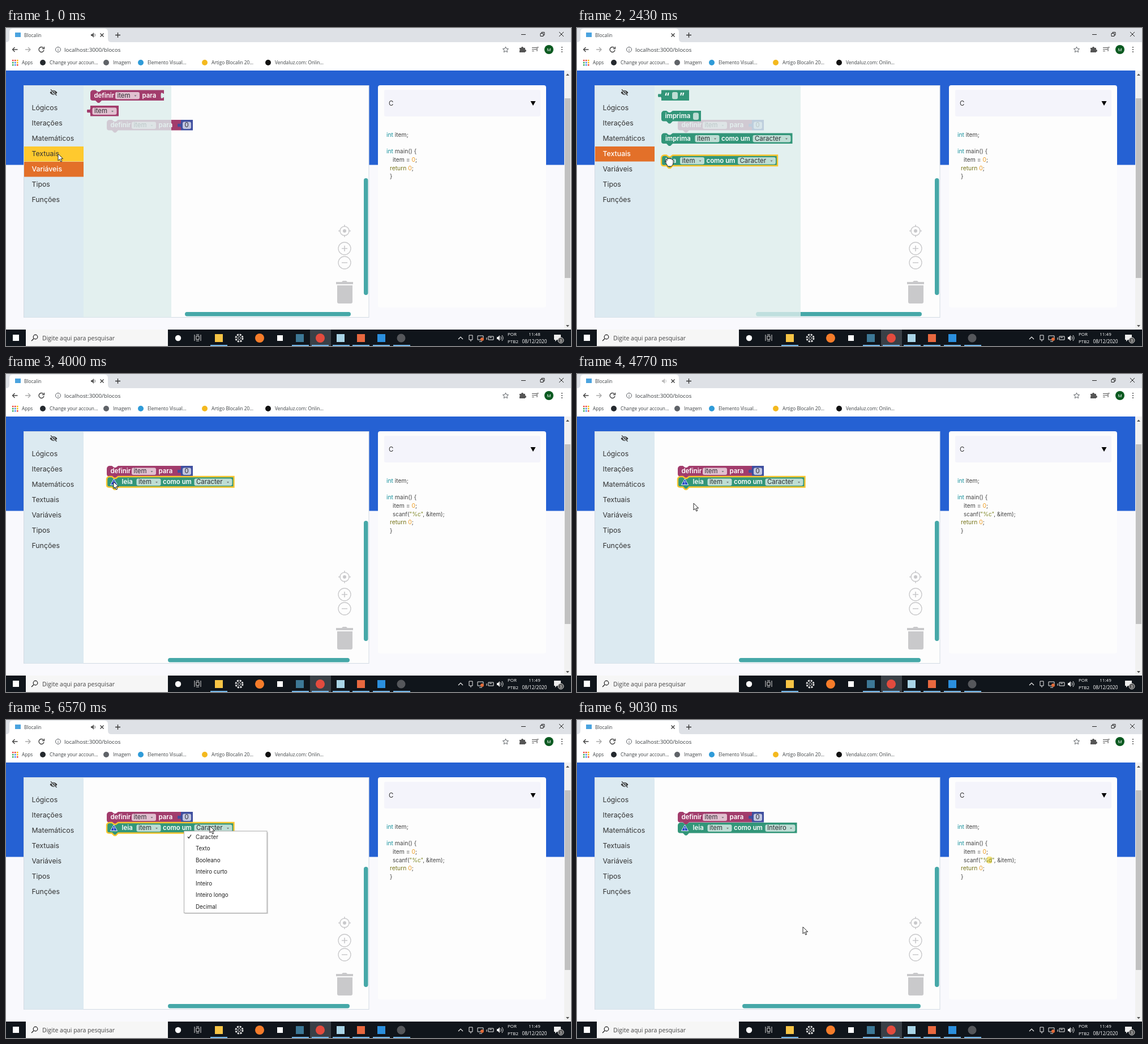
These frames come from a looping animation (998x561 px, 9.06 s). An HTML page:

```html
<!DOCTYPE html>
<html lang="pt">
<head>
<meta charset="utf-8">
<title>Blocos</title>
<style>
html, body { margin: 0; width: 100%; height: 100%; overflow: hidden; background: #fff; }
svg { display: block; width: 998px; height: 561px; }
.ui { font-family: "Open Sans", "Noto Sans", sans-serif; white-space: pre; }
.app { font-family: Inter, "Open Sans", sans-serif; white-space: pre; }
</style>
</head>
<body>
<svg id="stage" viewBox="0 0 998 561"><g id="page"></g><g id="live"></g></svg>
<script>
const LOOP = 9060;
const COLOR = { variable: '#a23c6c', text: '#329679', math: '#3f4f9f', bar: '#46a8a8', flyout: '#deeeed', menu: '#dceaf1' };

const rect = (x, y, w, h, fill, more = '') => `<rect x="${x}" y="${y}" width="${w}" height="${h}" fill="${fill}" ${more}/>`;
const circle = (x, y, r, fill, more = '') => `<circle cx="${x}" cy="${y}" r="${r}" fill="${fill}" ${more}/>`;
const line = (d, color, width = 1, more = '') => `<path d="${d}" fill="none" stroke="${color}" stroke-width="${width}" ${more}/>`;
const shape = (d, fill, more = '') => `<path d="${d}" fill="${fill}" ${more}/>`;
const ui = (x, y, size, s, fill = '#3c4043', more = '') => `<text class="ui" x="${x}" y="${y}" font-size="${size}" fill="${fill}" ${more}>${s}</text>`;
const app = (x, y, size, s, fill = '#333', more = '') => `<text class="app" x="${x}" y="${y}" font-size="${size}" fill="${fill}" ${more}>${s}</text>`;
const ink = (color, s) => `<tspan fill="${color}">${s}</tspan>`;

function browser() {
  const dots = ['#ea4335', '#ea4335', '#fbbc04', '#34a853', '#4285f4', '#fbbc04', '#34a853', '#4285f4', '#ea4335'];
  const bookmarks = [
    [77, 'Change your accoun...', '#24292e'], [189, 'Imagem', '#5f6368'], [250, 'Elemento Visual...', '#2f9bd8'],
    [363, 'Artigo Blocalin 20...', '#f4b91f'], [475, 'Vendaluz.com: Onlin...', '#111']];
  return rect(0, 0, 998, 25, '#dee1e6')
    + shape('M0 25q6 0 6-6V7q0-6 6-6H174q6 0 6 6V19q0 6 6 6z', '#fff')
    + rect(0, 25, 998, 50, '#fff')
    + rect(16, 8, 10, 8, '#4aa3df')
    + ui(32, 16, 8.3, 'Blocalin')
    + line('M166.500 9.500l6 6m0-6l-6 6', '#333', 1.2)
    + line('M193 12.500h9m-4.500-4.500v9', '#333', 1.3)
    + line('M910 11.500h8M977 7l8 8m0-8l-8 8', '#222')
    + line('M944 9.500h5v5h-5zM946 9.500v-2h5v5h-2', '#222')
    + line('M20.500 38h-9m4-4l-4 4 4 4', '#444', 1.4)
    + line('M34 38h9m-4-4l4 4-4 4', '#aaa', 1.4)
    + line('M66 35a4.500 4.500 0 1 0 1 4M67.500 33v3.500H64', '#444', 1.4)
    + circle(92, 38, 4.5, 'none', 'stroke="#5f6368"') + line('M92 37.500v3M92 35v1', '#5f6368')
    + ui(103, 41.5, 9.8, 'localhost:3000/blocos')
    + line('M882.500 33l1.500 3.500 3.500.3-2.700 2.400.8 3.500-3.100-1.900-3.100 1.900.8-3.500-2.700-2.400 3.500-.3z', '#5f6368')
    + shape('M907 35h3a2 2 0 0 1 4 0h3v3a2 2 0 0 1 0 4v1h-10v-3a2 2 0 0 0 0-3z', '#555')
    + line('M929 34.500h8M929 37.500h8M929 40.500h4M938 41v-7h3', '#555', 1.2)
    + circle(959, 38, 8, '#0b5a20') + ui(959, 41, 8, 'M', '#fff', 'text-anchor="middle"')
    + [34, 38, 42].map(y => circle(982, y, 1.1, '#555')).join('')
    + dots.map((c, i) => rect(11 + i % 3 * 4, 56 + Math.floor(i / 3) * 4, 2.5, 2.5, c)).join('')
    + ui(28, 64, 8.2, 'Apps')
    + bookmarks.map(([x, s, c]) => circle(x - 12, 61, 5, c) + ui(x, 64, 8.3, s)).join('');
}

function taskbar() {
  const tiles = [[376, '#f6c445'], [519, '#3d7896'], [591, '#a9d4e6'], [627, '#e8683f'], [663, '#2b8fdd']];
  const running = [376, 520, 555, 592, 627, 663, 699];
  return rect(0, 532, 998, 29, '#10151b')
    + rect(12, 541, 11, 11, '#fff')
    + rect(35, 532, 251, 29, '#f6f6f6')
    + circle(52, 545, 3.8, 'none', 'stroke="#222" stroke-width="1.2"') + line('M49 548l-4 4', '#222', 1.2)
    + ui(64, 551, 10.5, 'Digite aqui para pesquisar', '#444')
    + circle(304, 547, 5.2, '#fff')
    + line('M333 541v11M336 543.500h5v6h-5zM336 541h5M336 552h5M344 541v11', '#ddd')
    + circle(412, 547, 6, 'none', 'stroke="#ddd" stroke-width="3" stroke-dasharray="3 1.700"') + circle(412, 547, 2.5, 'none', 'stroke="#ddd"')
    + circle(448, 547, 8, '#f57c2a') + rect(479, 542, 10, 10, '#fff')
    + rect(537, 532, 37, 29, '#3a4047')
    + circle(555, 547, 8, '#e34b3e') + circle(698, 547, 7.5, '#55575b')
    + tiles.map(([x, c]) => rect(x - 7, 540, 14, 14, c)).join('')
    + running.map(x => rect(x - 15, 559, 30, 2, '#76b9ed')).join('')
    + line('M799 549l4-4 4 4', '#eee', 1.2)
    + line('M818 542h6v8h-6zM821 550v3', '#eee')
    + line('M833 543h10v7h-10zM836 553h5', '#eee') + circle(841, 549, 3, '#e06a38')
    + line('M852 544h9v6h-9zM849 546v4M854 546h4', '#eee')
    + shape('M867 545h2l3-3v10l-3-3h-2z', '#eee') + line('M874 544q2 3 0 6M876 542q4 5 0 10', '#eee')
    + ui(886, 543, 8, 'POR', '#fff') + ui(886, 556, 8, 'PTB2', '#fff')
    + ui(933.5, 556, 8.3, '08/12/2020', '#fff', 'text-anchor="middle"')
    + shape('M968 541h12v9h-7l-3 3v-3h-2z', '#eee') + circle(980, 551, 5, '#555', 'stroke="#ccc"')
    + ui(980, 554, 7, '3', '#fff', 'text-anchor="middle"');
}

function workspace() {
  const grey = '#c9c9cb';
  const ring = y => circle(598, y, 11, 'none', `stroke="${grey}" stroke-width="1.300"`);
  return rect(0, 75, 998, 457, '#f9f9fd')
    + rect(0, 75, 986, 166.5, '#2561d3')
    + rect(31.5, 101.5, 609.5, 409, '#fdfdfd', 'stroke="#d3dbe3" stroke-width="1"')
    + circle(598, 358, 8, 'none', `stroke="${grey}" stroke-width="1.500"`) + circle(598, 358, 3, grey)
    + line('M598 347v4M598 365v4M587 358h4M605 358h4', grey, 1.5)
    + ring(389) + ring(414) + line('M593 389h10M598 384v10M593 414h10', grey, 1.6)
    + shape('M583 448h10l2-2h6l2 2h10v4h-30zM585 454h27v29q0 3-3 3h-21q-3 0-3-3z', grey)
    + rect(657, 101, 297, 392, '#fdfdfd', 'rx="4"')
    + rect(668, 109, 276, 47, '#f4f4fb', 'rx="3"')
    + app(676, 137, 11.5, 'C') + shape('M926.500 129h9l-4.500 8z', '#000')
    + rect(986, 75, 12, 457, '#f1f1f1') + rect(987, 124, 10, 317, '#c1c1c1')
    + shape('M989 84h6l-3-3.500z', '#555') + shape('M989 524h6l-3 3.500z', '#555');
}

const TAB = 'c0 7.500-6-6-6 5.600s6-1.900 6 5.600';
const SELECTED = 'stroke="#fbc52d" stroke-width="2.400"';

const statement = (x, y, w, color, more = '') => shape(
  `M${x} ${y + 5}a5 5 0 0 1 5-5h4l4 3h3l4-3H${x + w}v18.500H${x + 20}l-4 4h-3l-4-4H${x + 4}q-4 0-4-4z`, color, more);
const valueBlock = (x, y, w, color) => shape(`M${x} ${y}h${w}v18.500H${x}V${y + 15.2}` +
  `c0-7.500-6 1.500-6-5.600s6 1.900 6-5.600z`, color);
const label = (x, y, s) => app(x, y + 13, 11.4, s, '#fff', 'font-weight="600"');
const field = (x, y, w, s, arrow = true) => rect(x, y + 3.5, w, 12.5, '#fff', 'rx="3" fill-opacity=".68"')
  + app(x + 3.5, y + 13.2, 11.4, s, '#2e2e33') + (arrow ? shape(`M${x + w - 9.5} ${y + 9}h4l-2 2.600z`, '#777') : '');

function defineBlock(x, y, w) {
  return statement(x, y, w, COLOR.variable) + label(x + 6.5, y, 'definir')
    + field(x + 44, y, 43, 'item') + label(x + 91.5, y, 'para');
}

function typedBlock(x, y, verb, shift, type, typeWidth, more) {
  return statement(x, y, 138 + shift + typeWidth, COLOR.text, more) + label(x + 7 + Math.min(shift, 19.5) * (verb === 'leia'), y, verb)
    + field(x + 33 + shift, y, 43, 'item') + label(x + 79.5 + shift, y, 'como um') + field(x + 135 + shift, y, typeWidth, type);
}

const warning = (x, y) => shape(`M${x} ${y + 14.5}l6-10.500 6 10.500z`, '#1d45c4', 'stroke="#e8eefc" stroke-linejoin="round"')
  + line(`M${x + 6} ${y + 8}v3M${x + 6} ${y + 12}v1.300`, '#fff', 1.3);

function variableFlyout() {
  return defineBlock(149, 109.5, 130) + shape(`M279.500 113.500${TAB}z`, COLOR.flyout)
    + valueBlock(149, 137, 50, COLOR.variable) + field(152.5, 137, 43, 'item');
}

function textFlyout(pressed) {
  return valueBlock(149, 109.5, 49, COLOR.text)
    + app(154, 127, 17, '“', '#fff', 'font-weight="700"') + app(181, 127, 17, '”', '#fff', 'font-weight="700"')
    + field(168, 109.5, 10, '', false)
    + statement(149, 146, 70, COLOR.text) + label(155.5, 146, 'imprima') + field(205, 146, 10, '', false)
    + typedBlock(149, 185.5, 'imprima', 26.5, 'Caracter', 67)
    + typedBlock(149, 224.5, 'leia', 0, 'Caracter', 67, pressed ? SELECTED : '');
}

function menu(t) {
  const names = ['Lógicos', 'Iterações', 'Matemáticos', 'Textuais', 'Variáveis', 'Tipos', 'Funções'];
  const chosen = t < 500 ? 4 : t < 2860 ? 3 : -1;
  const hovered = t < 500 ? 3 : -1;
  return rect(32, 102, 105, 408.5, COLOR.menu)
    + shape('M77.500 114q6.500-8 13 0q-6.500 8-13 0z', '#333') + circle(84, 114, 2.5, '#333', 'stroke="#dceaf1"')
    + line('M79 109l10 10', COLOR.menu, 2.5) + line('M79 108.500l10.500 10.500', '#333', 1.3)
    + names.map((name, i) => {
      const y = 128 + 27 * i;
      const fill = i === chosen ? '#e37029' : i === hovered ? '#ffc92e' : null;
      return (fill ? rect(32, y, 105, 26.5, fill) : '')
        + app(45.5, y + 17, 12.3, name, i === chosen ? '#fff' : '#333', i === chosen ? 'font-weight="500"' : '');
    }).join('');
}

function code(t) {
  const dragged = t >= 2950 && t < 3950, joined = t >= 3950, integer = t >= 8350;
  const row = n => 192 + 14.65 * n;
  const put = (x, n, s) => app(x, row(n), 10.3, s, '#444');
  const scanRow = dragged ? 5 : 4;
  const end = dragged ? 6 : joined ? 5 : 4;
  const glow = Math.max(0, Math.min(1, (3900 - t) / 400));
  let out = '';
  if (dragged) out += `<g opacity="${glow}">${rect(683, 255, 92, 13.5, '#f8df91')}${rect(672, 269.5, 5.5, 13.5, '#f8df91')}</g>`;
  if (integer) out += rect(724, 241, 9, 12, '#f3e27c', 'rx="3"');
  out += put(672, 0, ink('#16919c', 'int') + ' item;')
    + put(672, 2, ink('#16919c', 'int') + ' main() {')
    + put(683, 3, 'item = ' + ink('#ee9b22', '0') + ';')
    + put(678, end, ink('#77751b', 'return') + ' ' + ink('#ee9b22', '0') + ';')
    + put(678, end + 1, '}');
  if (dragged || joined) {
    out += `<text class="app" x="683" y="${row(scanRow)}" font-size="9.9" fill="#444">scanf(${ink('#7d8522', `"%${integer ? 'd' : 'c'}"`)}, &amp;item);</text>`;
  }
  return out;
}

function scrollbars(t) {
  const [x1, x2, y1, y2] = t < 2860 ? [316, 609, 265, 471] : t < 3950 ? [312, 626, 245, 468]
    : t < 8250 ? [286, 607, 259, 471] : [292, 607, 259, 471];
  return rect(x1, 501, x2 - x1, 7.5, COLOR.bar, 'rx="3.700"') + rect(632, y1, 7.5, y2 - y1, COLOR.bar, 'rx="3.700"');
}

function typeList(t, [, y]) {
  const types = ['Caracter', 'Texto', 'Booleano', 'Inteiro curto', 'Inteiro', 'Inteiro longo', 'Decimal'];
  const over = Math.floor((y + 1 - 196) / 20.45);
  return rect(316, 198, 147, 144, '#000', 'opacity=".15"')
    + rect(314.5, 196, 146.5, 144.5, '#fff', 'stroke="#aaa"')
    + types.map((name, i) => (i === over ? rect(315, 196.5 + 20.45 * i, 145.5, 20.4, '#d6e9f8') : '')
      + app(335, 210 + 20.45 * i, 9.8, name, '#222')).join('')
    + line('M321 206l2 2.500 4-6', '#222', 1.3);
}

// Pointer tip: time, x, y
const PATH = [[0, 92, 222], [900, 92, 222], [1350, 128, 226], [1900, 158, 231], [2800, 158, 231],
  [3150, 188, 234], [3370, 194, 232], [3600, 193, 218], [3900, 190, 190], [4150, 190, 190], [4650, 206, 228], [4850, 206, 228],
  [5350, 360, 187], [6600, 360, 187], [7350, 368, 283], [8300, 368, 283], [8850, 399, 365], [LOOP, 399, 365]];

function pointerAt(t) {
  const i = PATH.findIndex(p => p[0] > t);
  const [a, b] = [PATH[i - 1], PATH[i]];
  const u = (t - a[0]) / (b[0] - a[0]), e = u * u * (3 - 2 * u);
  return [a[1] + (b[1] - a[1]) * e, a[2] + (b[2] - a[2]) * e];
}

function pointer(t, [x, y]) {
  const hand = t > 1800 && t < 4000;
  const d = hand ? 'M-2 2q2-2 3 1V0q2-2 3 0q2-2 3 0q2-1 3 1q2 0 2 2v4q0 3-3 6H2Q1 9-2 6q-2-2 0-2l2 2z'
    : 'M0 0V12l2.800-2.600 2 4.600 2-.9-2-4.400h3.900z';
  return `<g transform="translate(${x} ${y})">${shape(d, '#fff', 'stroke="#111" stroke-width=".9"')}</g>`;
}

function speaker(t) {
  const level = t < 900 ? (850 - t) / 350 : t < 3950 ? 0 : t < 5400 ? (4950 - t) / 450 : (7750 - t) / 400;
  const opacity = Math.max(0, Math.min(1, level));
  return `<g opacity="${opacity}">${shape('M150 11h2l3-3v9l-3-3h-2z', '#555')}${line('M156.500 10q2 2.500 0 5', '#555')}</g>`;
}

function blocks(t, [px, py]) {
  let out = defineBlock(178, 162, 131) + valueBlock(309, 162, 21, COLOR.math) + field(312, 162, 15, '0', false);
  if (t >= 2860 && t < 3950) {
    out += `<g>${typedBlock(px - 12, py - 7, 'leia', 0, 'Caracter', 67, SELECTED + ' fill-opacity=".8"')}</g>`;
  } else if (t >= 3950) {
    const integer = t >= 8250;
    out += typedBlock(178, 181, 'leia', 19.5, integer ? 'Inteiro' : 'Caracter', integer ? 53 : 67, t < 8850 ? SELECTED : '')
      + warning(184.5, 181);
  }
  return out;
}

function flyout(t) {
  if (t >= 2860) return '';
  const first = t < 500;
  return rect(137, 102, first ? 155 : 258, 408.5, COLOR.flyout, 'opacity=".8"')
    + (first ? variableFlyout() : textFlyout(t > 2000));
}

const live = document.getElementById('live');
document.getElementById('page').innerHTML = workspace() + browser() + taskbar();

function draw(t) {
  const tip = pointerAt(t);
  live.innerHTML = scrollbars(t) + blocks(t, tip) + flyout(t) + menu(t) + code(t)
    + (t >= 5420 && t < 8250 ? typeList(t, tip) : '')
    + speaker(t) + ui(933.5, 543, 8, t < 900 ? '11:48' : '11:49', '#fff', 'text-anchor="middle"')
    + pointer(t, tip);
}

const start = performance.now();
function tick() {
  draw((performance.now() - start) % LOOP);
  requestAnimationFrame(tick);
}
tick();
</script>
</body>
</html>
```
